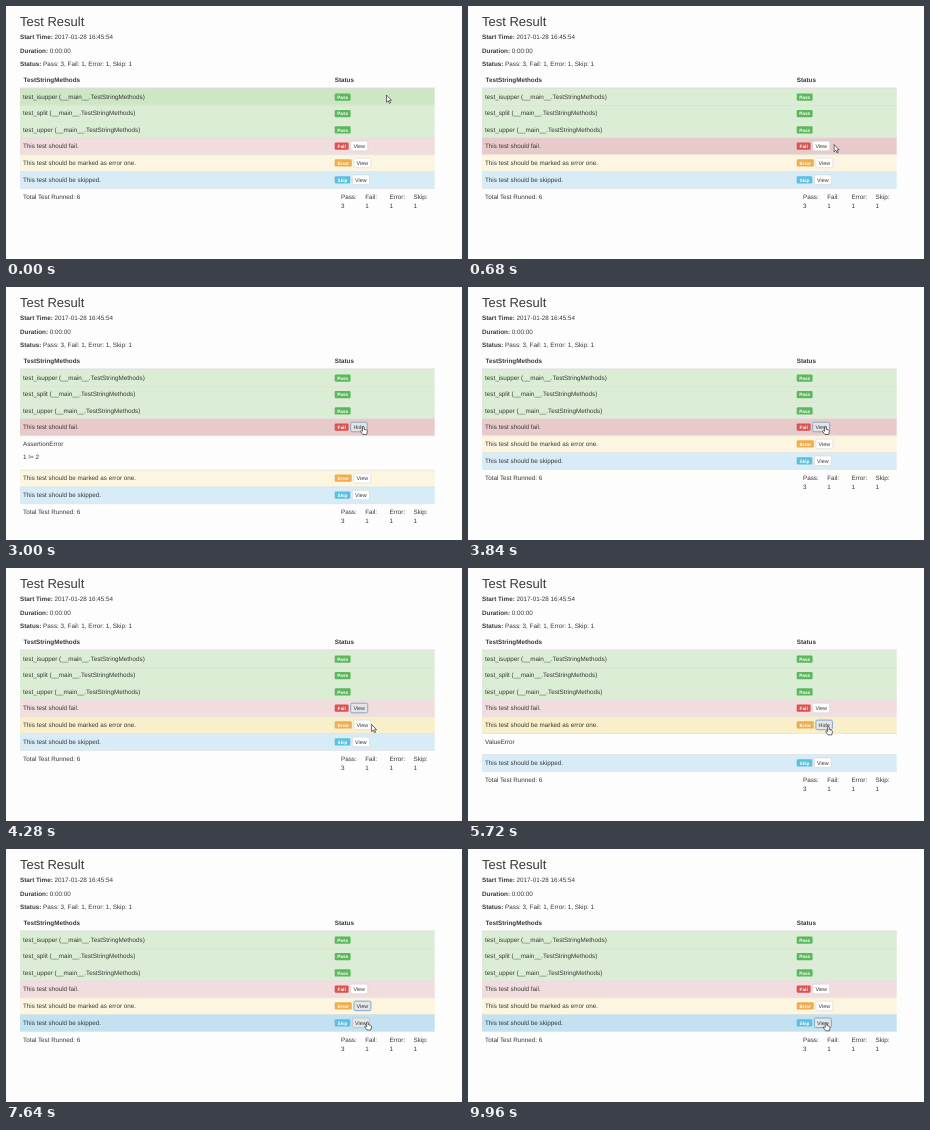
These frames come from a looping animation (456x253 px, 10 s). An HTML page:

```html
<!DOCTYPE html>
<html lang="en">
<head>
<meta charset="utf-8">
<title>Test Result</title>
<style>
  html, body { margin: 0; width: 100%; height: 100%; overflow: hidden; background: #fdfdfe; }
  svg { display: block; }
  text { font: 6.3px "Liberation Sans", Arial, sans-serif; fill: #383838; text-rendering: geometricPrecision; white-space: pre; }
  .bold { font-weight: bold; }
  .title { font-size: 13px; }
  .label { font-size: 4.73px; font-weight: bold; fill: #fff; }
  .button { font-size: 5.4px; }
  .cursor { fill: #fff; stroke: #222; stroke-width: .65; stroke-linejoin: round; }
</style>
</head>
<body>
<svg id="stage" width="456" height="253" viewBox="0 0 456 253"></svg>
<script>
const LOOP = 10000, LEFT = 14, WIDTH = 414.7, STATUS_X = 328.7;
const stage = document.getElementById('stage');

function add(parent, tag, attrs, content = '') {
  const el = document.createElementNS('http://www.w3.org/2000/svg', tag);
  for (const key in attrs) el.setAttribute(key, attrs[key]);
  el.textContent = content;
  return parent.appendChild(el);
}
const write = (parent, x, y, content, cls = '') => add(parent, 'text', { x, y, class: cls }, content);
const line = (parent, y, height = .5) =>
  add(parent, 'rect', { x: LEFT, y, width: WIDTH, height, fill: '#d8d8d8' });

write(stage, LEFT, 19.5, 'Test Result', 'title');
[['Start Time:', ' 2017-01-28 16:45:54', 33.4],
 ['Duration:', ' 0:00:00', 46.7],
 ['Status:', ' Pass: 3, Fail: 1, Error: 1, Skip: 1', 60]].forEach(([name, value, y]) => {
  const el = write(stage, LEFT, y, '');
  add(el, 'tspan', { class: 'bold' }, name);
  add(el, 'tspan', {}, value);
});
write(stage, 17.5, 76.3, 'TestStringMethods', 'bold');
write(stage, STATUS_X, 76.3, 'Status', 'bold');
line(stage, 81.6, .9);

const kinds = {
  Pass: { base: '#dcedd5', hover: '#cde6c3', badge: '#5cb85c', width: 15.9 },
  Fail: { base: '#f1dddd', hover: '#e9caca', badge: '#d9534f', width: 13.9 },
  Error: { base: '#fcf6e1', hover: '#f9efca', badge: '#f0ad4e', width: 17.1 },
  Skip: { base: '#d7ecf6', hover: '#c2e2f2', badge: '#5bc0de', width: 15.6 }
};

// open/close: when the details show; focus/blur: when the button has the focus ring
const rows = [
  { kind: 'Pass', name: 'test_isupper (__main__.TestStringMethods)' },
  { kind: 'Pass', name: 'test_split (__main__.TestStringMethods)' },
  { kind: 'Pass', name: 'test_upper (__main__.TestStringMethods)' },
  { kind: 'Fail', name: 'This test should fail.', details: ['AssertionError', '1 != 2'], extra: 34.2,
    open: 1680, close: 3080, focus: 1600, blur: 5480 },
  { kind: 'Error', name: 'This test should be marked as error one.', details: ['ValueError'], extra: 21,
    open: 5680, close: 7000, focus: 5480, blur: 8000 },
  { kind: 'Skip', name: 'This test should be skipped.', details: ['This is a skipped test.'], extra: 25.6,
    open: 8200, close: 9640, focus: 8000, blur: LOOP }
];

let tableEnd = 82.5;
for (const row of rows) {
  const kind = kinds[row.kind];
  row.top = tableEnd;
  row.height = row.details ? 16.9 : 16.4;
  tableEnd += row.height;
  const middle = row.details ? 8.1 : 8.4;
  row.group = add(stage, 'g', {});
  row.back = add(row.group, 'rect', { x: LEFT, y: 0, width: WIDTH, height: row.height });
  line(row.group, 0);
  write(row.group, 17, middle + 2, row.name);
  add(row.group, 'rect', { x: STATUS_X, y: middle - 3.4, width: kind.width, height: 7.3, rx: 1.2, fill: kind.badge });
  write(row.group, STATUS_X + kind.width / 2, middle + 1.9, row.kind, 'label').setAttribute('text-anchor', 'middle');
  if (!row.details) continue;

  row.buttonX = STATUS_X + kind.width + 2.1;
  row.button = add(row.group, 'rect', { x: row.buttonX, y: middle - 4.6, height: 9.6, rx: 1.3 });
  row.caption = write(row.group, row.buttonX + 2.7, middle + 1.9, '', 'button');
  row.panel = add(row.group, 'g', {});
  line(row.panel, row.height);
  row.details.forEach((detail, i) => write(row.panel, 17, row.height + 10.4 + 13.4 * i, detail));
}

const footer = add(stage, 'g', {});
line(footer, 0);
write(footer, 17, 10.7, 'Total Test Runned: 6');
['Pass:', 'Fail:', 'Error:', 'Skip:'].forEach((name, i) => {
  write(footer, 335 + 24.2 * i, 10.7, name);
  write(footer, 335 + 24.2 * i, 19.7, i ? '1' : '3');
});

const arrow = 'M0 0V7.2L1.7 5.7L2.9 8.3L4 7.8L2.9 5.3H5Z';
const hand = 'M-.8 .6Q0-.6 .8 .6V3L3.2 3.6Q4.2 4 4 5.2L3.4 8.2H-.4L-2.6 5.2Q-2.7 4-1.6 4.2L-.8 5Z';
const cursor = add(stage, 'path', { class: 'cursor' });

// Each move: start, end, x, y
const moves = [
  [40, 720, 366, 139], [960, 1480, 357.3, 139.3],
  [3840, 4280, 365.6, 156.4], [4480, 4760, 360.4, 158.7],
  [7320, 7640, 361.5, 172.8], [8000, 8040, 358, 173.6]
];
function cursorAt(t) {
  let x = 380.5, y = 89;
  for (const [start, end, toX, toY] of moves) {
    const p = Math.min(1, Math.max(0, (t - start) / (end - start)));
    const eased = p * p * (3 - 2 * p);
    x += (toX - x) * eased;
    y += (toY - y) * eased;
  }
  return [x, y];
}

function render(t) {
  const [x, y] = cursorAt(t);
  let shift = 0, overButton = false;
  for (const row of rows) {
    const top = row.top + shift, inside = y >= top && y < top + row.height;
    row.group.setAttribute('transform', `translate(0 ${top})`);
    row.back.setAttribute('fill', kinds[row.kind][inside ? 'hover' : 'base']);
    if (!row.details) continue;

    const open = t >= row.open && t < row.close;
    const focused = t >= row.focus && t < row.blur;
    const width = open ? 16.5 : 17;
    const over = inside && x >= row.buttonX && x < row.buttonX + width;
    overButton ||= over;
    row.button.setAttribute('width', width);
    row.button.setAttribute('fill', over || focused ? '#e3e5e8' : '#fff');
    row.button.setAttribute('stroke', focused ? '#86a6c8' : over ? '#adadad' : '#ccc');
    row.button.setAttribute('stroke-width', focused ? 1 : .5);
    row.caption.textContent = open ? 'Hide' : 'View';
    row.panel.setAttribute('display', open ? 'inline' : 'none');
    if (open) shift += row.extra;
  }
  footer.setAttribute('transform', `translate(0 ${tableEnd + shift})`);
  cursor.setAttribute('d', overButton ? hand : arrow);
  cursor.setAttribute('transform', `translate(${x} ${y})`);
}

const begin = performance.now();
function tick() {
  render((performance.now() - begin) % LOOP);
  requestAnimationFrame(tick);
}
tick();
</script>
</body>
</html>
```
